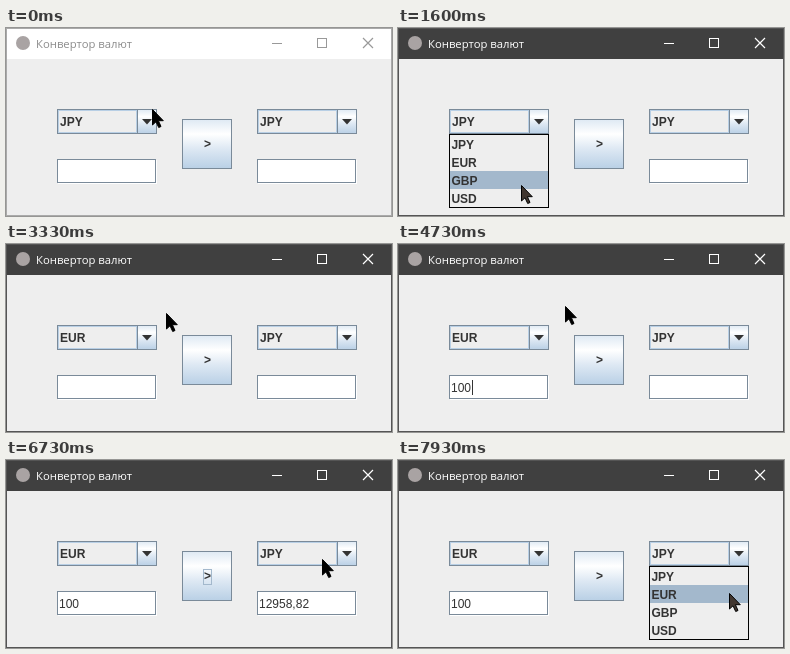
These frames come from a looping animation (386x188 px, 8 s). An HTML page:

```html
<!DOCTYPE html>
<html lang="ru">
<head>
<meta charset="utf-8">
<title>Конвертор валют</title>
<style>
html, body { margin: 0; width: 100%; height: 100%; overflow: hidden; background: #eee; }
svg { display: block; width: 100vw; height: 100vh; }
rect, line { shape-rendering: crispEdges; }
text { font: 12px "Liberation Sans", Arial, sans-serif; fill: #333; white-space: pre; }
.bold { font-weight: bold; }
.title { font: 11.3px "Open Sans", "Noto Sans", sans-serif; }
</style>
</head>
<body>
<svg id="stage" viewBox="0 0 386 188">
  <defs>
    <linearGradient id="ocean" x1="0" y1="0" x2="0" y2="1">
      <stop offset="0" stop-color="#dde8f3"/>
      <stop offset=".3" stop-color="#fff"/>
      <stop offset=".6" stop-color="#dde8f3"/>
      <stop offset="1" stop-color="#b8cfe5"/>
    </linearGradient>
  </defs>
</svg>
<script>
const LOOP = 8000, TICK = 1000 / 15, BLINK = 470, ROW = 18;
const DARK = '#7a8a99', PALE = '#b8cfe5', SELECT = '#a3b8cc', FACE = '#eee';
const CODES = ['JPY', 'EUR', 'GBP', 'USD'];
const stage = document.getElementById('stage');

function add(parent, tag, attrs, content) {
  const el = document.createElementNS('http://www.w3.org/2000/svg', tag);
  for (const k in attrs) el.setAttribute(k, attrs[k]);
  if (content !== undefined) el.textContent = content;
  parent.appendChild(el);
  return el;
}
const group = (parent, x = 0, y = 0) => add(parent, 'g', { transform: `translate(${x} ${y})` });
const fill = (p, x, y, width, height, color) => add(p, 'rect', { x, y, width, height, fill: color });
const frame = (p, x, y, w, h, color) =>
  add(p, 'rect', { x: x + .5, y: y + .5, width: w - 1, height: h - 1, fill: 'none', stroke: color });
const label = (p, x, y, str, cls = '') => add(p, 'text', { x, y, class: cls }, str);
const show = (el, on) => el.setAttribute('visibility', on ? 'visible' : 'hidden');

function makeCombo(x, y) {
  const g = group(stage, x, y);
  const back = fill(g, 0, 0, 100, 25, FACE);
  frame(g, 1, 1, 79, 23, PALE);
  frame(g, 0, 0, 81, 25, DARK);
  fill(g, 80, 0, 20, 25, 'url(#ocean)');
  frame(g, 80, 0, 20, 25, DARK);
  add(g, 'path', { d: 'M85 10H95L90 15.5Z', fill: '#333' });
  return { back, text: label(g, 3, 17, 'JPY', 'bold') };
}

function makeField(x, y) {
  const g = group(stage, x, y);
  fill(g, 1, 1, 99, 24, '#fff');
  frame(g, 0, 0, 99, 24, DARK);
  return label(g, 2, 17, '');
}

function makePopup(x, y) {
  const g = group(stage, x, y);
  fill(g, 0, 0, 100, 74, FACE);
  const bar = fill(g, 1, 1, 98, ROW, SELECT);
  frame(g, 0, 0, 100, 74, '#000');
  CODES.forEach((code, i) => label(g, 2.4, 15 + ROW * i, code, 'bold'));
  return { g, bar };
}

// Window
fill(stage, 0, 0, 386, 188, FACE);
const bar = fill(stage, 0, 0, 386, 31, '#fff');
const edge = frame(stage, 0, 0, 386, 188, '#aaa');
add(stage, 'circle', { cx: 17, cy: 15, r: 7, fill: '#a9a3a3' });
const title = label(stage, 30, 20, 'Конвертор валют', 'title');
const controls = add(stage, 'g', { fill: 'none' });
add(controls, 'line', { x1: 266, y1: 15.5, x2: 276, y2: 15.5 });
add(controls, 'rect', { x: 311.5, y: 10.5, width: 9, height: 9 });
add(controls, 'path', { d: 'M357 10L367 20M367 10L357 20', 'stroke-width': 1.2 });

// Controls
const combo = makeCombo(51, 81);
makeCombo(251, 81);
const amount = makeField(51, 131);
const result = makeField(251, 131);
const caret = fill(stage, 53, 136, 1, 15, '#333');

const button = group(stage, 176, 91);
const face = fill(button, 0, 0, 50, 50, 'url(#ocean)');
frame(button, 0, 0, 50, 50, DARK);
const hover = group(button);
[PALE, DARK, PALE].forEach((color, i) => frame(hover, i, i, 50 - 2 * i, 50 - 2 * i, color));
const focus = frame(button, 21, 18, 9, 16, SELECT);
label(button, 22, 29, '>', 'bold');

const popups = [makePopup(51, 106), makePopup(251, 106)];

// Pointer
const pointer = group(stage);
const arrow = add(pointer, 'path', { d: 'M.5 .5V16L4 12.8L6.7 18.5L9 17.5L6.4 11.7H11.3Z', stroke: '#000' });
const beam = add(pointer, 'path', { d: 'M-4 -8H5M.5 -8V9M-4 9H5', stroke: '#000', 'stroke-width': 2.4 });

// Moments of the story
const ACTIVATE = 470, OPEN_LEFT = 530, PICK = 2470, CLICK_FIELD = 2670;
const KEYS = [3730, 4330, 4400];
const PRESS = 6070, RELEASE = 6200, CLICK_RIGHT = 7400, OPEN_RIGHT = 7470;

// Each stroke of the mouse eases to its end point; bow lifts the middle
const STROKES = [
  { from: 0, to: 870, x: 141, y: 96 },
  { from: 1000, to: 1670, x: 122, y: 159 },
  { from: 1800, to: 2200, x: 106, y: 141 },
  { from: 2670, to: 3330, x: 160, y: 69 },
  { from: 4530, to: 4730, x: 167, y: 62 },
  { from: 4730, to: 5430, x: 334, y: 110, bow: 20 },
  { from: 5430, to: PRESS, x: 201, y: 113 },
  { from: RELEASE, to: 6930, x: 342, y: 96 },
  { from: 7600, to: 7930, x: 331, y: 133 }
];
const ease = p => p * p * (3 - 2 * p);

function pointAt(t) {
  let x = 146, y = 81;
  for (const s of STROKES) {
    const p = Math.min(1, Math.max(0, (t - s.from) / (s.to - s.from)));
    x += (s.x - x) * ease(p);
    y += (s.y - y) * ease(p) - (s.bow || 0) * Math.sin(Math.PI * p);
  }
  return [Math.round(x), Math.round(y)];
}
const within = (v, from, to) => v >= from && v < to;

function render(ms) {
  const t = Math.round(Math.floor((ms + 4) / TICK) * TICK / 10) * 10;
  const [x, y] = pointAt(t);
  const active = t >= ACTIVATE;

  bar.setAttribute('fill', active ? '#404040' : '#fff');
  edge.setAttribute('stroke', active ? '#555' : '#aaa');
  title.style.fill = active ? '#fff' : '#8c8c8c';
  controls.setAttribute('stroke', active ? '#fff' : '#999');

  combo.text.textContent = t >= PICK ? 'EUR' : 'JPY';
  combo.back.setAttribute('fill', within(t, PICK, CLICK_FIELD) ? SELECT : FACE);

  // The caret restarts its blink at every key
  const hits = KEYS.filter(k => k <= t);
  const since = t - (hits.length ? hits[hits.length - 1] : CLICK_FIELD);
  amount.textContent = '100'.slice(0, hits.length);
  caret.setAttribute('x', 53 + 7 * hits.length);
  show(caret, within(t, CLICK_FIELD, PRESS) && since % (2 * BLINK) < BLINK);

  const pressed = within(t, PRESS, RELEASE);
  face.setAttribute('fill', pressed ? PALE : 'url(#ocean)');
  show(hover, !pressed && within(x, 176, 226) && within(y, 91, 141));
  show(focus, within(t, PRESS, CLICK_RIGHT));
  result.textContent = t >= RELEASE ? '12958,82' : '';

  const open = [within(t, OPEN_LEFT, PICK), t >= OPEN_RIGHT];
  const row = Math.max(0, Math.floor((y - 107) / ROW));
  popups.forEach((p, i) => {
    p.g.setAttribute('display', open[i] ? 'inline' : 'none');
    p.bar.setAttribute('y', 1 + ROW * Math.min(row, 3));
  });

  const anyOpen = open[0] || open[1];
  const overField = !anyOpen && within(x, 51, 151) && within(y, 131, 156);
  pointer.setAttribute('transform', `translate(${x} ${y})`);
  arrow.setAttribute('fill', anyOpen ? '#41362f' : '#000');
  show(arrow, !overField);
  show(beam, overField);
}

const start = performance.now();
function loop() {
  render((performance.now() - start) % LOOP);
  requestAnimationFrame(loop);
}
loop();
</script>
</body>
</html>
```
